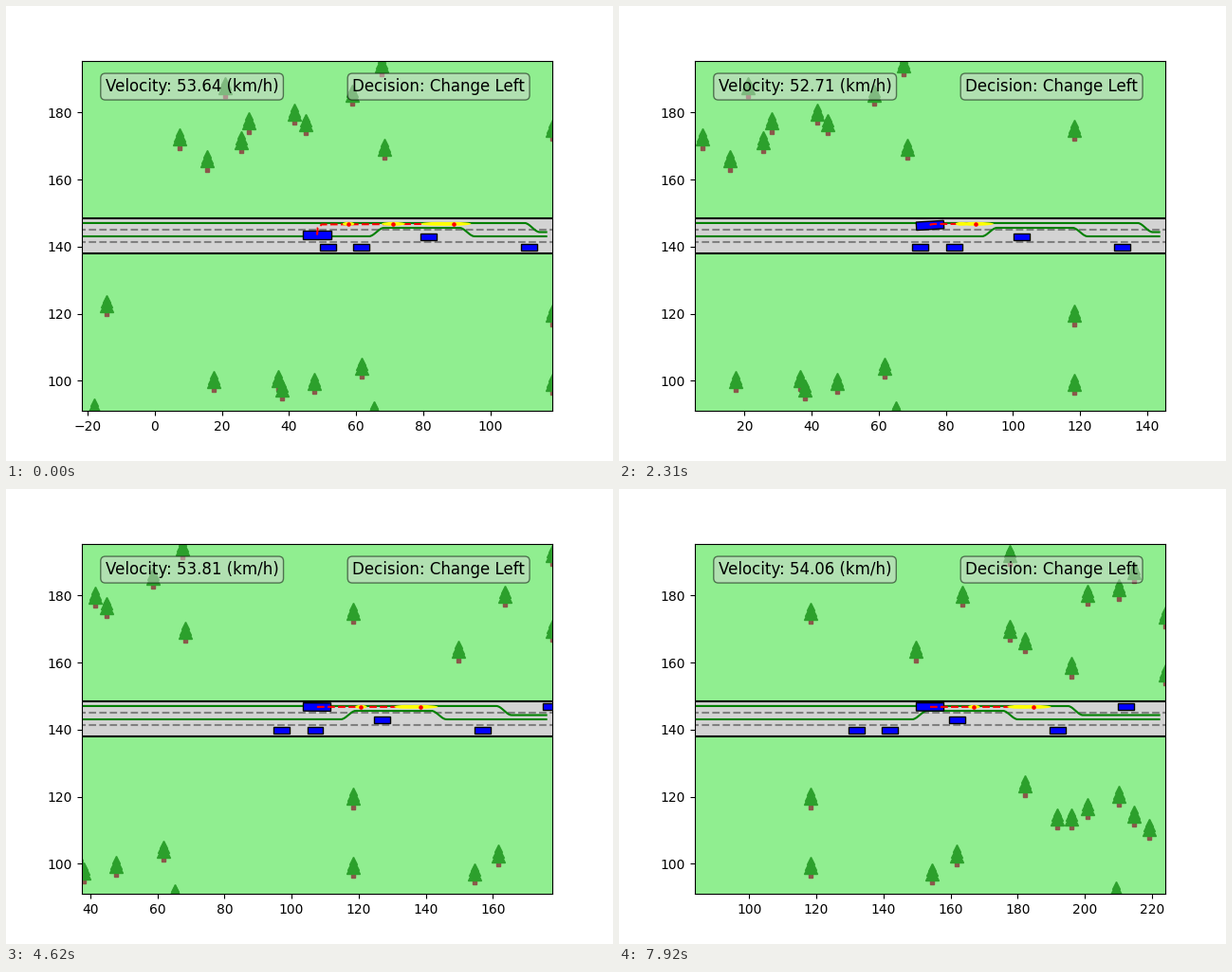
A matplotlib script for the animation above (8 s loop, 640 px wide and 480 px high).

```python
import numpy as np
import matplotlib.pyplot as plt
from matplotlib.animation import FuncAnimation
from matplotlib.patches import Ellipse, Rectangle

TICK, LOOP, HOLD = 50, 8000, 330      # ms
HALF = 70.1                           # half of the visible road length
ROAD = 138 + 3.5 * np.arange(4)       # borders of the three lanes
LANE_Y = 146.8
PLAN_ENDS = [88.95, 138.3, 184.65]
CARS = [(51.5, 139.85), (61.6, 139.85), (81.5, 143.05), (111.5, 139.85),
        (131.9, 146.8)]

# Where trees stand: x of a column, then the y of each tree in it
TREES = [
    (-18.2, 89), (-14.4, 120), (7.4, 169.6), (15.6, 163.1), (17.5, 97.3),
    (20.9, 185), (25.6, 168.7), (28.1, 174.4), (36.7, 97.6), (38, 94.8),
    (41.6, 177), (44.9, 174), (47.6, 96.7), (58.7, 182.7), (61.7, 101.3),
    (65.2, 88.3), (67.5, 191.4), (68.4, 166.5), (118.4, 172.2, 117, 96.4),
    (149.7, 160.8), (154.5, 94.5), (161.7, 100), (163.6, 177.4),
    (177.6, 189.6, 167), (182.2, 163.4, 120.7), (191.7, 110.9),
    (196.1, 156, 110.9), (200.9, 177.7, 114), (209.4, 89),
    (210.1, 179.2, 117.6), (214.6, 184.5, 111.7), (219.1, 107.8),
    (224, 171, 153.8),
]

fig, ax = plt.subplots(figsize=(6.4, 4.8), dpi=100)
ax.set_facecolor("lightgreen")
ax.set_autoscale_on(False)
half_height = HALF * 369.6 / 496      # equal scale on both axes
ax.set_ylim(ROAD.mean() - half_height, ROAD.mean() + half_height)

# Road
ax.axhspan(ROAD[0], ROAD[-1], color="lightgray", lw=0, zorder=0.5)
for y, color, style in zip(ROAD, ["black", "gray", "gray", "black"],
                           ["-", "--", "--", "-"]):
    ax.plot([-500, 500], [y, y], color=color, ls=style, lw=1.5, zorder=1.5)

# Each tree is a trunk below three shrinking tiers
tx, ty = np.array([(x, y) for x, *ys in TREES for y in ys]).T
ax.plot(tx, ty - 0.1, "s", color="tab:brown", ms=3, zorder=1)
for k in range(3):
    ax.plot(tx, ty + 2.5 + k, "^", color="tab:green", ms=10 - 2 * k,
            zorder=1.1)


def add_car(length, width):
    return ax.add_patch(Rectangle((0, 0), length, width, fc="blue",
                                  ec="black", lw=1, zorder=3,
                                  rotation_point="center"))


def place(car, x, y):
    car.set_xy((x - car.get_width() / 2, y - car.get_height() / 2))


def add_label(x, text):
    box = dict(boxstyle="round,pad=0.3", fc="lightgray", ec="black", alpha=0.5)
    return ax.text(x, 0.95, text, transform=ax.transAxes, fontsize=12,
                   va="top", bbox=box, zorder=7)


upper, = ax.plot([], [], color="green", lw=1.5, zorder=2)
lower, = ax.plot([], [], color="green", lw=1.5, zorder=2)
traffic = [add_car(4.8, 2) for _ in CARS]
ego = add_car(8.2, 2.4)
route, = ax.plot([], [], "r--", lw=1.5, zorder=4)
halos = [ax.add_patch(Ellipse((0, 0), 1, 1.1, color="yellow", lw=0, zorder=5))
         for _ in range(5)]
dots, = ax.plot([], [], "ro", ms=2.3, zorder=6)
speed = add_label(0.05, "")
add_label(0.575, "Decision: Change Left")


def ramp(x, middle, width=4.5):
    u = np.clip((x - middle) / width + 0.5, 0, 1)
    return u * u * (3 - 2 * u)


def update(i):
    step = min((i * TICK + TICK - 1) // HOLD, 24)
    # The drive waits for the first plan and stutters at the second
    t = np.interp(step, [1, 9, 10, 11, 24], [0, 8, 9.55, 10, 23])

    # Lane change: the gap closes, some headway is lost, the nose swings
    gap = 3.3 * np.exp(-t / 3)
    cx = 48.35 + 4.63 * t - 0.95 * (1 - np.exp(-t / 3))
    cy = LANE_Y - gap
    ax.set_xlim(cx - HALF, cx + HALF)
    place(ego, cx, cy)
    ego.angle = 14 * np.sin(np.pi * t / 7) * np.exp(-(t / 8) ** 2)
    for car, (x, y) in zip(traffic, CARS):
        place(car, x + 3.495 * t, y)

    # Free corridor around the ego
    plan = sum(cx > stop for stop in PLAN_ENDS)
    rise = 17.7 - 6.4 * plan - 2 * plan ** 2
    ahead = np.linspace(-HALF, 68.3, 600)
    bump = ramp(ahead, rise) - ramp(ahead, rise + 27)
    lower.set_data(cx + ahead, 143.08 + 2.55 * bump)
    upper.set_data(cx + ahead, 147.05 - 2.7 * ramp(ahead, rise + 46.4))

    # Planned route with waypoints and their growing uncertainty
    end = PLAN_ENDS[plan]
    route.set_data([cx, cx + 0.2, cx + 1.4, end],
                   [cy, cy + 0.65 * gap, cy + 0.95 * gap, LANE_Y])
    first = cx + (13.1 if plan else 9.35)
    points = np.append(np.arange(first, end, 13.4), end)
    shown = points[(points < end - 6) | (points == end)]
    dots.set_data(shown, np.full(len(shown), LANE_Y))
    for k, halo in enumerate(halos):
        halo.set_visible(k < len(points))
        if k < len(points):
            halo.set_center((points[k], LANE_Y))
            halo.set_width(10.6 if points[k] == end else 3.5 * (k + 1))

    v = np.interp(step, [0, 5, 9, 14, 18, 22, 24],
                  [53.64, 51.18, 54.24, 53.81, 53.77, 53.14, 54.06])
    speed.set_text(f"Velocity: {v:.2f} (km/h)")
    return []


anim = FuncAnimation(fig, update, frames=LOOP // TICK, interval=TICK,
                     init_func=lambda: update(0), repeat=True, repeat_delay=0)
plt.show()
```
